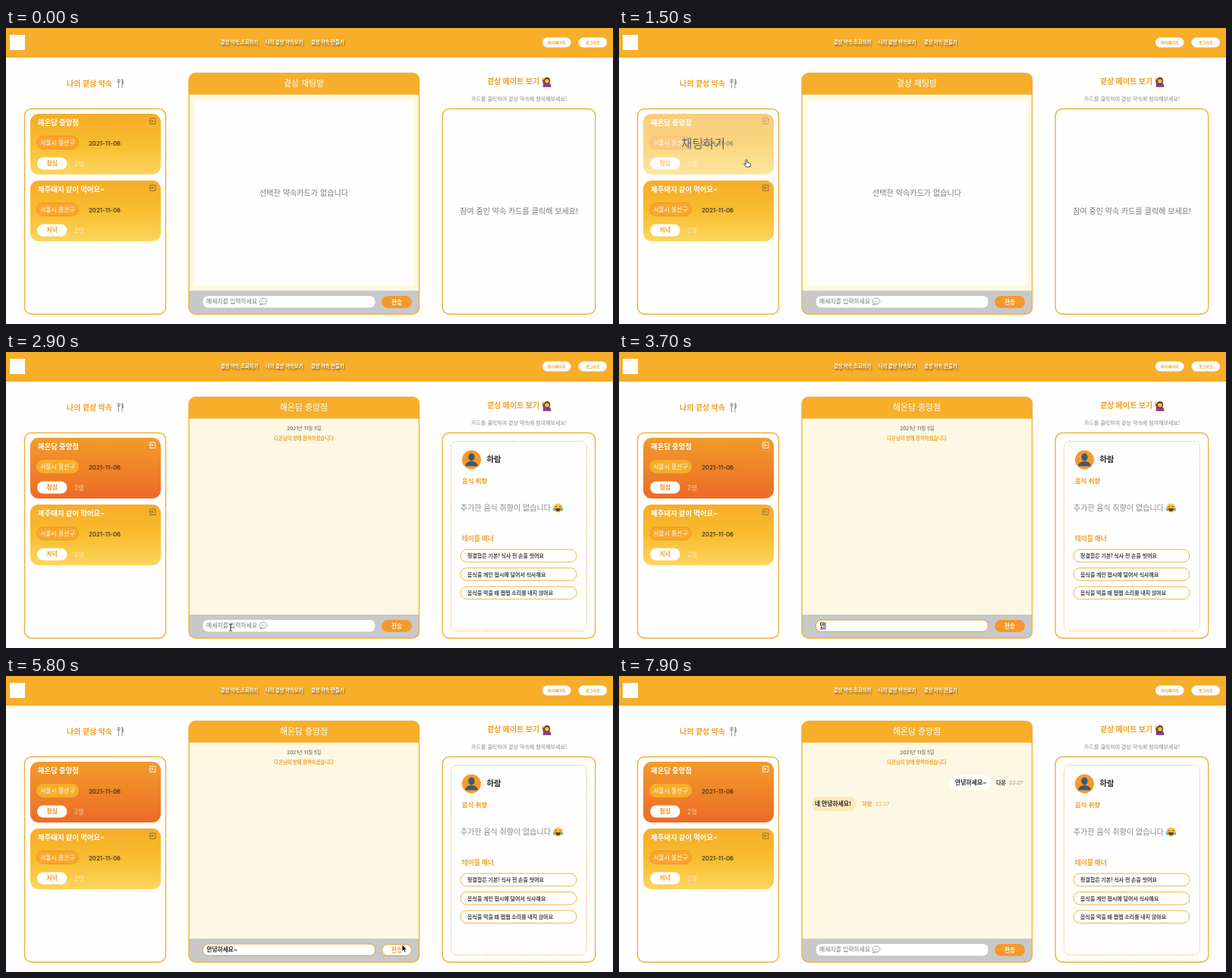
Recreate the animation shown at these times as an HTML page. Size 800 by 390 pixels, loop 8000 ms.

```html
<!DOCTYPE html>
<html lang="ko">
<head>
<meta charset="utf-8">
<title>밥 약속 채팅</title>
<style>
html, body { margin: 0; width: 100%; height: 100%; overflow: hidden; background: #fffefe; }
svg { display: block; width: 800px; height: 390px; font-family: Inter, 'Noto Sans CJK KR', 'Noto Sans CJK', sans-serif; }
.nav { text-shadow: 1px 1.5px 2px rgba(60, 40, 0, .65); }
</style>
</head>
<body>
<svg viewBox="0 0 800 390">
  <defs>
    <linearGradient id="idle" x2="0" y2="1"><stop stop-color="#f6ac29"/><stop offset=".5" stop-color="#f8bd2e"/><stop offset="1" stop-color="#fdd560"/></linearGradient>
    <linearGradient id="active" x2="0" y2="1"><stop stop-color="#f29c2b"/><stop offset="1" stop-color="#ec6b26"/></linearGradient>
  </defs>
  <g id="scene"></g>
</svg>
<script>
const LOOP = 8000, OPEN = 1700, FOCUS = 3100, TYPE = 3400, KEY = 120, SEND = 6150, REPLY = 7000, LEAVE = 6300;
const ORANGE = '#f6ae2b', DEEP = '#f0a024', LINE = '#efb13a', GREY = '#7b7b7b', INK = '#2a2a2a';
const APP = '곁상', SHOP = '해온담 중앙점', ME = '다온', MATE = '하람';
const KEYS = ['', 'ㅇ', '아', '안', '안ㄴ', '안녀', '안녕', '안녕ㅎ', '안녕하', '안녕핫', '안녕하세', '안녕하셍', '안녕하세요', '안녕하세요~'];
const PATH = [[300, 250, 394], [1000, 168, 174], [2100, 168, 174], [2800, 296, 363], [5100, 296, 363], [5700, 522, 354], [LEAVE, 522, 354]];

// y is the vertical middle of the line
const text = (x, y, size, str, fill, weight = 700, more = '') =>
  `<text x="${x}" y="${y + size * .37}" font-size="${size}" font-weight="${weight}" fill="${fill}" ${more}>${str}</text>`;
const mid = (x, y, size, str, fill, weight) => text(x, y, size, str, fill, weight, 'text-anchor="middle"');
const box = (x, y, w, h, r, fill, stroke = 'none', more = '') =>
  `<rect x="${x}" y="${y}" width="${w}" height="${h}" rx="${r}" fill="${fill}" stroke="${stroke}" ${more}/>`;
const path = (d, stroke, width = 1, fill = 'none') =>
  `<path d="${d}" fill="${fill}" stroke="${stroke}" stroke-width="${width}" stroke-linecap="round" stroke-linejoin="round"/>`;
const disc = (x, y, r, fill, ry = r) => `<ellipse cx="${x}" cy="${y}" rx="${r}" ry="${ry}" fill="${fill}"/>`;
const at = (x, y, body, more = '') => `<g transform="translate(${x} ${y})" ${more}>${body}</g>`;
const inside = (p, x, y, w, h) => p && p.x > x && p.x < x + w && p.y > y && p.y < y + h;

const cutlery = at(150.5, 73, path('M-3.5 -5.5v4h3v-4M-2 -5.5v11.5', '#8b9299', .9) + path('M2.5 6v-12q2 2 1.2 7h-1.2', '#7c848b', .8, '#a5acb2'));
const raisedHand = at(713, 71,
  path('M-5 6q0 -5 5 -5t5 5z', '#86408f', 1, '#86408f') + path('M-4 3l-1 -6', '#86408f', 2.2) +
  disc(0, -1.5, 4.2, '#633820', 4.6) + disc(0, -1, 2.8, '#f8bd35') + disc(-5, -4, 1.6, '#f8bd35'));
const bubble = at(339, 360, path('M-3.5 2.6L-4.5 5L-.5 3.6', '#777', .7, '#fff') +
  '<ellipse rx="5" ry="3.9" fill="#fff" stroke="#777" stroke-width=".7"/>' +
  [-2.2, 0, 2.2].map(x => disc(x, 0, .6, '#777')).join(''));
const joy = at(727.5, 205.5, disc(0, 0, 6, '#fbc638') + path('M-3.6 .6h7.2q-.6 4 -3.6 4t-3.6 -4z', 'none', 0, '#6b3a16') +
  path('M-4 -1.4q1.3 -1.8 2.6 0M1.4 -1.4q1.3 -1.8 2.6 0', '#6b3a16', .9) +
  disc(-5.2, 2, 1.5, '#4fb3ea', 2) + disc(5.2, 2, 1.5, '#4fb3ea', 2));

const CURSORS = {
  arrow: path('M0 0v9l2.1 -1.9l1.5 3.3l1.5 -.7l-1.5 -3.2h2.9z', '#fff', .7, '#111'),
  beam: path('M-1.5 -4.5q1.5 0 1.5 1v7q0 1 1.5 1M1.5 -4.5q-1.5 0 -1.5 1M0 3.5q0 1 -1.5 1', '#222'),
  hand: path('M-1 0q1 -1 1.8 0v3l3.7 1q1 .5 .8 2l-.8 3h-5l-2.8 -3.6q0 -1.2 1.3 -.6l1 .8z', '#222', .8, '#fff')
};

function pointer(t) {
  if (t < PATH[0][0] || t >= LEAVE || (t > FOCUS && t < 5100)) return null;
  const i = PATH.findIndex(k => t < k[0]), [t0, x0, y0] = PATH[i - 1], [t1, x1, y1] = PATH[i];
  const u = (t - t0) / (t1 - t0), e = u * u * (3 - 2 * u);
  return { x: +(x0 + (x1 - x0) * e).toFixed(1), y: +(y0 + (y1 - y0) * e).toFixed(1) };
}

function header() {
  const nav = [[283, APP + ' 약속 조회하기'], [342, `나의 ${APP} 약속보기`], [402, APP + ' 약속 만들기']];
  return box(0, 0, 800, 39, 0, ORANGE) + box(5, 9, 20, 20, 0, '#fff') +
    nav.map(([x, s]) => text(x, 19, 6.3, s, '#fff', 700, 'class="nav"')).join('') +
    [[707, '마이페이지'], [754.5, '로그아웃']].map(([x, s]) =>
      box(x, 12.5, 37.5, 13, 6.5, '#fff') + mid(x + 18.8, 18.7, 5.1, s, DEEP)).join('');
}

function card(y, title, meal, active, hover) {
  const icon = active ? '#fff' : '#8a6c36';
  const body = box(32, 0, 172, 80, 11, `url(#${active ? 'active' : 'idle'})`) +
    text(42, 12, 9.4, title, '#fff') +
    path('M189.8 8.5v-2.5h7v7.5h-7v-2.5M188.8 9.7h5M192.3 8l1.7 1.7l-1.7 1.7', icon, .9) +
    box(40.5, 29.5, 55, 17, 8.5, active ? '#f5ae2c' : '#f9a62c', active ? '#f3b32f' : '#f18c25', 'stroke-width=".8"') +
    text(45, 38, 7.9, '서울시 용산구', '#fff', 500) +
    text(109, 38.8, 7.9, '2021-11-06', '#33291c', 500) +
    box(41, 57.5, 39.5, 16, 8, '#fff') + mid(60.8, 65.5, 7.8, meal, active ? '#ef8d25' : DEEP) +
    text(90, 65.5, 8.5, '2명', active ? '#fbcaa0' : '#fee9b4', 400);
  let over = '';
  if (hover && active) over = box(32, 0, 172, 80, 11, 'rgba(0,0,0,.16)') + mid(111, 39.5, 16.5, '나가기', '#e3dcd6', 500);
  else if (hover) over = mid(111, 39.5, 15.8, '채팅하기', '#6c665c', 500);
  return at(0, y, `<g opacity="${hover && !active ? .6 : 1}">${body}</g>${over}`);
}

function appointments(open, p) {
  const hover = y => inside(p, 32, y, 172, 80);
  return text(80, 73, 10, `나의 ${APP} 약속`, DEEP) + cutlery +
    box(24.5, 106.5, 186, 270.5, 9, '#fffefe', LINE, 'stroke-width="1.4"') +
    card(113, SHOP, '점심', open, hover(113)) +
    card(201, '제주돼지 같이 먹어요~', '저녁', false, hover(201));
}

function messages(t) {
  let out = mid(393, 100.5, 6.5, '2021년 11월 5일', '#666', 500) +
    mid(392.5, 113.3, 6.3, `${ME}님이 방에 참여하셨습니다`, DEEP);
  if (t >= SEND) out += box(436, 131, 54, 19, 8.5, '#fff') + text(443, 140.5, 7.9, '안녕하세요~', INK) +
    text(497, 140.5, 7.2, ME, '#333') + text(514, 140.7, 6.8, '22:27', '#888', 400);
  if (t >= REPLY) out += box(254, 159, 58.5, 19, 8.5, '#fce9bd') + text(258, 168.5, 7.85, '네 안녕하세요!', INK) +
    text(320, 168.5, 7.4, MATE, DEEP) + text(338, 168.7, 6.8, '22:27', '#e8a84a', 400);
  return out;
}

function inputBar(t, p) {
  const focus = t >= FOCUS && t < SEND, hot = inside(p, 495, 353, 40, 16);
  const last = KEYS.length - 1;
  const step = Math.max(0, Math.min(last, Math.floor((t - TYPE) / KEY) + 1));
  const typed = focus ? KEYS[step] : '';
  let out = box(259.5, 353, 227, 15.5, 7, '#fff', focus ? '#f0982c' : 'none');
  if (typed) {
    const end = 264.5 + typed.length * 7.1;
    out += text(264.5, 360.5, 7.7, typed, INK);
    if (step < last) out += path(`M${end - 6.6} 365h6.2`, INK, .8);
    if (step < last || t < 5100) out += path(`M${end + (step === last ? -2 : .3)} 356.5v8.5`, INK, .8);
  } else out += text(264, 360.5, 7.85, '메세지를 입력하세요', '#777', 400) + bubble +
    (focus ? path('M264 356.5v8.5', INK, .8) : '');
  return out + box(495.5, 353.5, 39, 15, 7.5, hot ? '#fff' : '#f4992b', '#f4992b') +
    mid(515, 361, 7.6, '전송', hot ? '#f4992b' : '#fff');
}

function chat(t, open, p) {
  return box(241, 59.5, 303.5, 317.5, 9, '#fdf8e4') +
    path('M241 87.7V68.5q0 -9 9 -9h286q9 0 9 9v19.2z', 'none', 0, ORANGE) +
    mid(392.5, 73, 10.9, open ? SHOP : `${APP} 채팅방`, '#fff', 500) +
    (open ? messages(t) : box(249, 96, 288, 243, 0, '#fffefe') + mid(392.5, 217.5, 10.1, '선택한 약속카드가 없습니다', GREY, 400)) +
    path('M241 346h304v22q0 9 -9 9h-286q-9 0 -9 -9z', 'none', 0, '#c9c8c9') + inputBar(t, p) +
    box(241, 59.5, 303.5, 317.5, 9, 'none', LINE, 'stroke-width="1.4"');
}

function profile() {
  const manners = ['청결함은 기본! 식사 전 손을 씻어요', '음식을 개인 접시에 덜어서 식사해요', '음식을 먹을 때 쩝쩝 소리를 내지 않아요'];
  return box(586.5, 117.5, 179, 250, 8, 'none', '#dfb45c', 'stroke-width=".8" stroke-dasharray="2 1.3"') +
    disc(613.5, 142, 12.5, '#f59b2b') + disc(613.5, 138.5, 4.2, '#3c5a74', 5) +
    path('M605.5 150q0 -5 8 -6q8 1 8 6z', '#3c5a74', .5, '#3c5a74') +
    text(633.5, 141.5, 10.4, MATE, INK) +
    text(601, 170, 8.5, '음식 취향', DEEP) +
    text(599, 205.5, 10, '추가한 음식 취향이 없습니다', '#888', 400) + joy +
    text(601, 246, 8.7, '테이블 매너', DEEP) +
    manners.map((s, i) => box(599, 260.2 + i * 24.4, 153, 16.6, 8.3, '#fffefe', '#efb542') +
      text(608, 268.5 + i * 24.4, 7.03, s, '#444')).join('');
}

function mates(open) {
  return text(634, 70.5, 10, `${APP} 메이트 보기`, DEEP) + raisedHand +
    mid(676, 93.5, 7, `카드를 클릭하여 ${APP} 약속에 참여해보세요!`, '#8a8a8a', 400) +
    box(575.2, 106.5, 201.5, 270.5, 9, '#fffefe', LINE, 'stroke-width="1.4"') +
    (open ? profile() : mid(676, 241, 10.05, '참여 중인 약속 카드를 클릭해 보세요!', GREY, 400));
}

function cursor(p) {
  if (!p) return '';
  const hand = inside(p, 32, 113, 172, 80) || inside(p, 32, 201, 172, 80);
  const kind = hand ? 'hand' : inside(p, 259, 352, 228, 17) ? 'beam' : 'arrow';
  return at(p.x, p.y, CURSORS[kind]);
}

const scene = document.getElementById('scene');
let shown = '';
function frame(now) {
  const t = now % LOOP, open = t >= OPEN, p = pointer(t);
  const next = header() + appointments(open, p) + chat(t, open, p) + mates(open) + cursor(p);
  if (next !== shown) scene.innerHTML = shown = next;
  requestAnimationFrame(frame);
}
frame(0);
</script>
</body>
</html>
```
